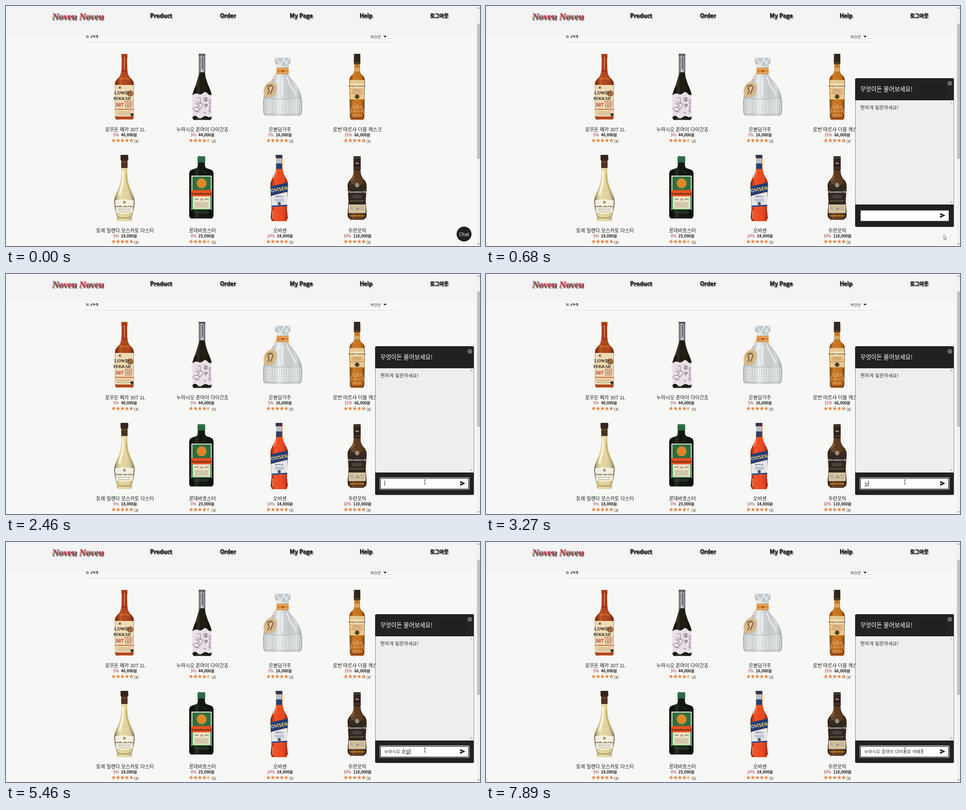
These frames come from a looping animation (1053 by 532 pixels, 8000 ms). An HTML page:

```html
<!DOCTYPE html>
<html lang="ko">
<head>
<meta charset="utf-8">
<title>Shop chat</title>
<style>
  html, body { margin: 0; width: 100%; height: 100%; overflow: hidden; background: #f7f7f5; }
  body { position: relative; }
  svg { position: absolute; left: 0; top: 0; display: block; }
  svg, #entry { font-family: "Noto Sans CJK KR", "Noto Sans CJK JP", "Noto Sans", sans-serif; }
  .nav { font-weight: 900; font-size: 12.5px; fill: #0b0b0b; stroke: #0b0b0b; stroke-width: .35px; text-shadow: 1.5px 1.5px 1.5px #8a8a8a; }
  .brand { font: italic bold 20.6px "Liberation Serif", serif; fill: #b84a52; text-shadow: 2px 2px 1.5px #4a3a3a; }
  .serif { font-family: "Liberation Serif", serif; }
  .mid { text-anchor: middle; }
  .bold { font-weight: 700; }
  .name { text-anchor: middle; font-weight: 350; }
  #entry { position: absolute; left: 840.5px; top: 458px; height: 12px; line-height: 12px; font-size: 9.5px;
    color: #222; white-space: pre; word-spacing: .9px; }
  #composing { text-decoration: underline; text-decoration-thickness: 1px; text-underline-offset: 1px; }
  #caret { display: inline-block; width: 1px; height: 12px; background: #111; vertical-align: top; }
</style>
</head>
<body>
<svg id="page" width="1053" height="532" viewBox="0 0 1053 532"></svg>
<svg id="chat" width="1053" height="532" viewBox="0 0 1053 532">
  <g id="button">
    <circle cx="1017.6" cy="505.5" r="16.6" fill="#212121"/>
    <text class="mid" x="1017.7" y="509.6" font-size="10.4" fill="#fff">Chat</text>
  </g>
  <g id="panel">
    <rect x="820" y="160" width="219.5" height="329.7" rx="3" fill="#212121"/>
    <rect x="820.5" y="209" width="218.5" height="231" fill="#eee"/>
    <text x="831.5" y="189.3" font-size="13.1" fill="#fff">무엇이든 물어보세요!</text>
    <text x="831.5" y="229" font-size="10.7" fill="#333">편하게 질문하세요!</text>
    <g fill="none" stroke="#fff">
      <circle cx="1030.3" cy="171.5" r="4.2"/>
      <path d="M1028.3 169.5l4 4m0-4l-4 4"/>
    </g>
    <path d="M1032 215.5h4.6l-2.3-2.6zM1032 433.5h4.6l-2.3 2.6z" fill="#8b8b8b"/>
    <rect x="832" y="453" width="196" height="23.5" rx="1" fill="#fff"/>
    <path id="edge" d="M832.5 476.5V453.5H1027.5" fill="none" stroke="#999" stroke-width=".6"/>
    <g id="ring" fill="none">
      <rect x="830.6" y="451.6" width="198.6" height="26.2" rx="2.5" stroke="#fff" stroke-width="1.1"/>
      <rect x="831.8" y="452.8" width="196.2" height="23.8" rx="1.5" stroke="#111" stroke-width="1.3"/>
    </g>
    <path d="M1009 459l11.5 5.2l-11.5 5.2v-4.1l7-1.1l-7-1.1z" fill="#111"/>
  </g>
</svg>
<div id="entry"><span id="committed"></span><span id="composing"></span><span id="caret"></span></div>
<svg width="1053" height="532" viewBox="0 0 1053 532">
  <g id="pointer">
    <circle id="press" r="6.5" fill="#f5e93c" fill-opacity=".8"/>
    <path id="arrow" d="M0 0V9L2 7.2L3.6 10.5L5 9.8L3.5 6.6H6.3Z" fill="#fff" stroke="#222" stroke-width=".7"/>
    <path id="beam" d="M-2.3-4.7h1.8l.5.5l.5-.5h1.8M0-4.2v8.4M-2.3 4.7h1.8l.5-.5l.5.5h1.8" fill="none" stroke="#222" stroke-width=".9"/>
  </g>
</svg>
<script>
const $ = id => document.getElementById(id);
const text = (x, y, size, fill, str, cls = 'mid') =>
  `<text x="${x}" y="${y}" font-size="${size}" fill="${fill}" class="${cls}">${str}</text>`;
const rect = (x, y, w, h, fill, r = 0) =>
  `<rect x="${x}" y="${y}" width="${w}" height="${h}" rx="${r}" fill="${fill}"/>`;
const shape = (d, fill) => `<path d="${d}" fill="${fill}"/>`;
const dot = (x, y, r, fill) => `<circle cx="${x}" cy="${y}" r="${r}" fill="${fill}"/>`;
const line = (d, stroke, width = 1) => `<path d="${d}" fill="none" stroke="${stroke}" stroke-width="${width}"/>`;

// Symmetric glass shape from [half width, y] pairs, shaded along its edges.
function glass(cx, profile, fill, shade = 'sheen') {
  const right = profile.map(([w, y]) => [cx + w, y]);
  const left = profile.map(([w, y]) => [cx - w, y]).reverse();
  const d = `M${[...right, ...left].join('L')}Z`;
  return shape(d, fill) + shape(d, `url(#${shade})`);
}
const fineLines = (x, y, w, n, color, gap = 2.5) =>
  Array.from({ length: n }, (_, i) => line(`M${x + i % 2} ${y + i * gap}h${w - 2 * (i % 2)}`, color, .7)).join('');

const bottles = [
  () => glass(263, [[7, 106], [7, 114], [6, 117], [6.5, 140], [8, 150], [11, 157], [17, 163], [20, 168], [21, 175], [20.5, 248], [18, 251.5]], '#b04618')
    + rect(256, 106, 14, 7, '#a9682f', 1) + rect(258.5, 108, 9, 38, '#a82c28')
    + line('M263 113v28', '#e4bc78', 1.5) + line('M252 164q11-8 22 0', '#d8752e', 2)
    + rect(242.5, 175, 41, 70, '#ecdcb4') + dot(253, 181, 2.5, '#a8452a') + dot(276, 194, 7, '#9a6a3e')
    + text(256.5, 195.5, 10, '#281a14', 'LOWD', 'mid serif bold') + text(258, 207.5, 9, '#281a14', 'PEKKAR', 'mid serif bold')
    + text(252, 223, 12.5, '#b3322a', '307', 'mid serif bold')
    + ['KENTUCKY', 'STRAIGHT', 'BOURBON', 'WHISKEY'].map((s, i) => text(272.5, 213 + i * 4, 3.4, '#a34838', s, 'mid bold')).join('')
    + rect(242.5, 228, 41, 2, '#c66b33') + fineLines(246, 234, 33, 4, '#b28d69') + dot(280, 241, 3.5, '#493126')
    + rect(243, 246, 40, 4, '#b5481c'),

  () => glass(435.5, [[7, 106], [7, 112], [6.5, 147], [8, 158], [12, 171], [17, 183], [20.5, 193], [21.5, 200], [21.5, 247], [19, 252.5]], '#1c190e')
    + rect(428, 107, 15, 40, '#85838a') + rect(433, 107, 5, 40, '#c5c2c7') + line('M436 112v28', '#4c4950', 2)
    + rect(428, 106, 15, 4, '#56535b') + line('M430 150L421 180', '#4b4528', 2)
    + shape('M414 198q7-6 13-3t11-2t10 1t9 2v49q-5 3-10 0t-11 2t-11-1t-11 1z', '#e9dfe7')
    + line('M425 205q8-5 7 3t4 9t-4 10t-8 9t-6-5t6-7t-3-8M422 210l8 4M424 217l10-2M423 224l9 4M421 232l9 3', '#827c88', 1.1)
    + text(443, 211, 10, '#28242a', '沼', 'mid serif') + text(444, 224, 9, '#28242a', '汐', 'mid serif')
    + [...'純米大吟醸'].map((c, i) => text(452.5, 211 + i * 6, 5.2, '#746979', c)).join('')
    + rect(440, 235, 3, 3, '#bb7387'),

  () => glass(614.5, [[15, 115], [18, 119], [17, 127], [13, 131], [13, 152], [17, 158], [23, 165], [30, 174], [36, 184], [40, 194], [43, 206], [43.5, 215], [43, 238], [38, 243.5]], '#dde1e1', 'crystal')
    + shape('M598 127l3-12h27l4 12l-14 5z', '#bbc6cc')
    + line('M602 117l8 13l7-14l6 13l5-12', '#f1f4f5', 2)
    + rect(601, 137, 27, 14, '#d98a3e', 1) + line('M601 140h27M601 148h27', '#f0c281', 1.5) + dot(615, 144, 3, '#b56623')
    + rect(573, 205, 83, 34, 'url(#facets)', 4)
    + line('M605 157q-5 18-20 40M614 157v44M624 157q5 18 20 40', '#f8fafa', 2)
    + line('M573 203q41 7 83 0M574 239q40 5 81 0', '#a9b3b6')
    + line('M603 145L588 170', '#9c713e')
    + '<ellipse cx="587" cy="185.5" rx="14" ry="18.5" transform="rotate(25 587 185.5)" fill="#d8b88a"/>'
    + line('M581 195q5-5 2-11t6-8q7 3 3 9l-5 10', '#76553a', 2) + line('M578 179q9-7 13-3', '#76553a'),

  () => glass(780, [[7, 106], [7.5, 128], [6, 130], [6.5, 146], [9, 151], [14, 155], [16.5, 160], [17, 166], [16, 248], [13, 252.5]], '#c8731f')
    + rect(773, 106, 14, 23, '#31271f', 2) + line('M773 126h14', '#9a7642')
    + rect(775, 137, 10, 8, '#dba95a')
    + rect(764, 164, 32, 43, '#e6c58e') + rect(764, 172, 32, 9, '#f2dfb8')
    + text(780, 179, 5, '#4e321b', 'ROBN MARSHA', 'mid serif bold')
    + fineLines(769, 185, 22, 3, '#a66b32') + dot(780, 201, 5, '#574022') + line('M764 194h32', '#a9803c')
    + line('M766 239v-13h5v-5h4v7h4v-9h3v7h5v-4h4v7h3v10M767 233h27M769 242h22', '#e0b67c', 1.2)
    + rect(766, 247, 28, 4, '#88491c'),

  () => glass(263, [[8, 330], [7, 359], [7, 376], [9, 390], [13, 403], [18, 415], [22, 426], [23, 434], [21, 450], [17, 466], [17, 474], [13, 476.5]], '#e3d5a0')
    + rect(254.5, 330, 17, 12, '#34241c', 1) + rect(256, 341, 14, 18, '#4b3020') + line('M256 346h14', '#9b744d')
    + line('M260 364v26l-8 30', '#fbf6dc', 4) + line('M267 372l2 20l9 28', '#a8965a', 1.5)
    + shape('M242 431q21-5 42 0l-3 27q-18 5-36 0z', '#f3eedf') + dot(263, 435, 3, '#a19473')
    + text(263, 446, 5, '#3b352b', 'TORRE MILENDA', 'mid serif bold')
    + text(263, 452, 3.5, '#685c48', 'MOSCATO D’ASTI', 'mid serif') + line('M250 456h26', '#a19473')
    + line('M249 468q14 4 28 0', '#a8904e', 2),

  () => glass(434, [[8, 334], [8, 354], [10, 359], [19, 362], [25, 365], [27, 371], [27, 466], [24, 471]], '#10170f')
    + rect(425.5, 333, 17, 14, '#276842', 2) + line('M426 336h16', '#4c9061')
    + rect(412, 376, 45, 76, '#eee9d5') + rect(414, 378, 41, 33, '#2c7041') + dot(434.5, 393, 11, '#d8872e')
    + rect(414, 424, 41, 27, '#e9e2c5') + line('M414 421v30h41v-30', '#2d7848', 2)
    + rect(411, 408, 47, 14, '#e5531f') + text(434.5, 418, 7, '#241713', 'Rundebachster', 'mid serif bold')
    + text(434.5, 431, 7, '#c4432c', '56', 'mid serif bold') + line('M419 428h9M441 428h9', '#6c6954', 1.5)
    + fineLines(419, 436, 31, 5, '#8b8a70') + fineLines(418, 456, 33, 2, '#65705f', 3),

  () => glass(607, [[7, 330], [7, 352], [7.5, 364], [11, 374], [16, 383], [19, 391], [19.5, 399], [18, 430], [17, 450], [19, 470], [16, 477]], '#ee4820')
    + rect(599, 330, 15, 7, '#2d3654', 1) + rect(600, 338, 13, 11, '#b5bfca') + rect(600, 349, 13, 12, '#29416d')
    + line('M601 365l-6 18', '#ff9a66', 2)
    + shape('M588 400l38-9v20l-38 10z', '#233d78')
    + `<g transform="rotate(-10 607 406)">${text(607, 410, 10.2, '#f3d27c', 'OVISEN', 'mid bold')}</g>`
    + shape('M589 421l36-9v31l-35 3z', '#e5e7e7')
    + text(607, 424, 3.5, '#374c78', 'APERITIVO', 'mid bold') + fineLines(597, 428, 21, 3, '#657693')
    + dot(607, 438, 3.5, '#425886') + line('M590 444l35-2', '#263f76', 3) + line('M593 453v18', '#ff9c69', 2),

  () => glass(780, [[7, 333], [7.5, 364], [8.5, 373], [12, 381], [18, 388], [21, 395], [21, 403], [19, 432], [21, 462], [20, 469], [14, 474]], '#593a20')
    + rect(772, 333, 16, 31, '#2d241e', 2) + line('M773 337h14M773 359h14', '#8a7253') + rect(776, 347, 8, 3, '#a78355')
    + line('M774 376l-8 13', '#9c6a35', 2)
    + shape('M760 398q20-6 40 0l-3 42h-34z', '#302923') + dot(780, 397, 5, '#a18b6b')
    + text(780, 414, 7, '#eee6d6', 'Duranmorrik', 'mid serif bold')
    + fineLines(769, 420, 22, 3, '#8d8069') + line('M764 432h31', '#a38457')
    + rect(761, 440, 38, 19, '#d4c4a5') + text(780, 453, 9, '#594a37', '18', 'mid serif')
    + fineLines(764, 445, 9, 4, '#9c8a70') + fineLines(787, 445, 9, 4, '#9c8a70')
    + line('M764 465h32', '#ad671e', 4)
];

const products = [
  ['로우든 페카 307 1L', '5%', '40,000'], ['누마시오 준마이 다이긴죠', '5%', '44,000'],
  ['은봉담가주', '5%', '26,000'], ['로번 마르샤 더블 캐스크', '15%', '66,000'],
  ['토레 밀렌다 모스카토 다스티', '5%', '18,000'], ['룬데바흐스터', '0%', '25,000'],
  ['오비센', '10%', '14,000'], ['두란모릭', '10%', '110,000']
];

function star(x, y, half) {
  const points = Array.from({ length: 10 }, (_, i) => {
    const r = i % 2 ? 2.3 : 4.9, a = i * Math.PI / 5;
    return [x + r * Math.sin(a), y - r * Math.cos(a)];
  });
  return `<polygon points="${half ? points.slice(5).concat([points[0]]).join(' ') : points.join(' ')}" fill="#e28b4b"/>`;
}

function product([name, off, price], i) {
  const col = i % 4, cx = 264.5 + 172 * col, dy = 224 * (i >> 2);
  const stars = [0, 1, 2, 3, 4].map(n => star(cx - 25.5 + 9.85 * n, 298.3 + dy, n === 4 && col === 1)).join('');
  return bottles[i]() + text(cx, 277.8 + dy, 10.8, '#1c1c1c', name, 'name')
    + `<text class="mid" x="${cx}" y="${289 + dy}" font-size="8.4"><tspan fill="#96263a" font-weight="500">${off}</tspan>`
    + `<tspan dx="5" font-weight="700" fill="#111">${price}원</tspan></text>`
    + stars + text(cx + 20, 302.6 + dy, 8, '#111', '(3)', '');
}

const nav = [[344.5, 'Product'], [493, 'Order'], [656, 'My Page'], [800, 'Help']];
$('page').innerHTML = `<defs>
  <linearGradient id="sheen">
    <stop offset="0" stop-opacity=".5"/><stop offset=".18" stop-opacity=".08"/>
    <stop offset=".3" stop-color="#fff" stop-opacity=".1"/><stop offset=".45" stop-color="#fff" stop-opacity="0"/>
    <stop offset=".8" stop-opacity=".08"/><stop offset="1" stop-opacity=".5"/>
  </linearGradient>
  <linearGradient id="crystal">
    <stop offset="0" stop-opacity=".25"/><stop offset=".15" stop-opacity=".04"/><stop offset=".4" stop-color="#fff" stop-opacity=".4"/>
    <stop offset=".85" stop-opacity=".04"/><stop offset="1" stop-opacity=".25"/>
  </linearGradient>
  <pattern id="facets" width="5" height="5" patternUnits="userSpaceOnUse">
    <path d="M0 0l5 5M5 0l-5 5" stroke="#fff" stroke-width=".8"/><path d="M2.5 1v3" stroke="#a4afb2" stroke-width=".7"/>
  </pattern></defs>`
  + rect(0, 0, 1053, 532, '#f7f7f5')
  + '<text x="177" y="70.3" font-size="8.5" fill="#222">총 <tspan font-weight="700">24개</tspan></text>'
  + text(809, 70.8, 8.8, '#222', '최신순', '')
  + shape('M838.5 66h7l-3.5 3.8z', '#111')
  + line('M177.5 80.6H866', '#dadad9')
  + products.map(product).join('')
  + rect(0, 0, 1046, 65, '#f4f4f4')
  + '<text class="brand" x="102" y="30">Noveu Noveu</text>'
  + nav.map(([x, s]) => `<text class="nav mid" x="${x}" y="26">${s}</text>`).join('')
  + '<text class="nav mid" x="962.5" y="25.5" style="font-size:11.1px">로그아웃</text>'
  + rect(1046, 0, 7, 532, '#f1f1f1') + rect(1046.5, 39, 6.5, 300, '#c1c1c1')
  + shape('M1047.5 5.5h4.6l-2.3-2.6zM1047.5 526.5h4.6l-2.3 2.6z', '#666');

const LOOP = 8000, OPEN = 650, FOCUS = 1410;
const A = '누마시오 ', B = A + '준마이 ', C = B + '다이긴죠 ';
// [time, field text]; the last syllable is still being composed unless it is a space or "?".
const keys = [
  [3130, 'ㄴ'], [3270, '누'], [3870, '눔'], [3940, '누마'], [4410, '누맛'], [4450, '누마시'], [4640, '누마싱'], [4680, '누마시오'],
  [4820, A], [4900, A + 'ㅈ'], [4990, A + '주'], [5080, A + '준'], [5260, A + '준ㅁ'], [5320, A + '준마'], [5460, A + '준망'], [5520, A + '준마이'],
  [5670, B], [5830, B + 'ㄷ'], [5890, B + '다'], [6030, B + '당'], [6130, B + '다이'], [6310, B + '다익'], [6400, B + '다이기'],
  [6500, B + '다이긴'], [6600, B + '다이긵'], [6700, B + '다이긴죠'],
  [7410, C], [7490, C + 'ㅇ'], [7570, C + '어'], [7650, C + '어ㄸ'], [7730, C + '어때'], [7890, C + '어때?']
];
const path = [[390, 1020, 536], [600, 1017, 508], [860, 1017, 508], [1060, 930.5, 455], [1210, 930.5, 455], [1270, 930.5, 461], [LOOP, 930.5, 461]];

function pointerAt(t) {
  const i = path.findIndex(p => p[0] > t);
  if (i < 1) return [1020, 545];
  const [t0, x0, y0] = path[i - 1], [t1, x1, y1] = path[i];
  const u = (t - t0) / (t1 - t0), e = u * u * (3 - 2 * u);
  return [x0 + (x1 - x0) * e, y0 + (y1 - y0) * e];
}
const show = (id, on) => { $(id).style.display = on ? '' : 'none'; };

function draw(now) {
  const t = now % LOOP;
  show('button', t < OPEN);
  show('panel', t >= OPEN);
  show('ring', t >= FOCUS);
  show('edge', t < FOCUS);
  show('entry', t >= FOCUS);

  const [keyTime, value] = keys.filter(k => k[0] <= t).pop() || [FOCUS, ''];
  const split = /[ ?]$/.test(value) ? value.length : Math.max(0, value.length - 1);
  $('committed').textContent = value.slice(0, split);
  $('composing').textContent = value.slice(split);
  $('caret').style.visibility = (t - keyTime) % 1050 < 510 ? 'visible' : 'hidden';

  const [x, y] = pointerAt(t);
  const overInput = t >= OPEN && x < 1028 && y < 476.5;
  $('pointer').setAttribute('transform', `translate(${x} ${y})`);
  show('arrow', !overInput);
  show('beam', overInput);
  show('press', (t >= 590 && t < OPEN) || (t >= FOCUS && t < 1470));
  requestAnimationFrame(() => draw(performance.now()));
}
draw(0);
</script>
</body>
</html>
```
